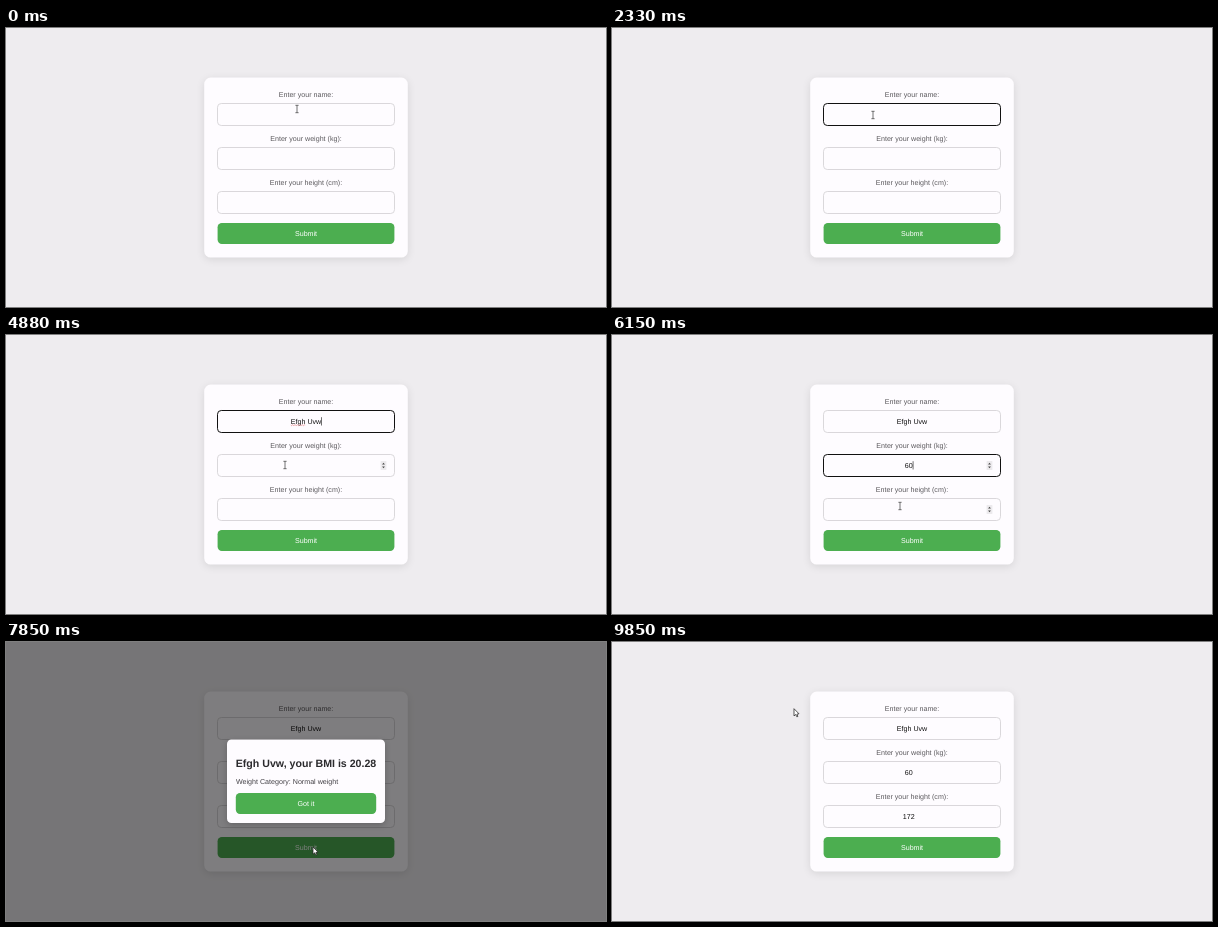
An HTML page with a canvas that plays this animation: 600x279 px, repeating every 9880 ms.

```html
<!DOCTYPE html>
<html lang="en">
<head>
<meta charset="utf-8">
<title>BMI form</title>
<style>
  html, body { margin: 0; width: 100%; height: 100%; overflow: hidden; background: #eeecef; }
  canvas { display: block; width: 600px; height: 279px; }
</style>
</head>
<body>
<canvas id="stage"></canvas>
<script>
const W = 600, H = 279, MID = W / 2, LOOP = 9880;
const BLINK = 235, GLIDE = 220;
const OPEN = 7850, CLOSE = 9610;
const FONT = '"Liberation Sans", Arial, sans-serif';
const SIZE = 7.11;
const NAME = 'Efgh Uvw';
const INK = '#111', CARD = '#fefcff', GREEN = '#4cae50', GREEN_HOVER = '#45a049';

const canvas = document.getElementById('stage');
const ctx = canvas.getContext('2d');
const dpr = window.devicePixelRatio || 1;
canvas.width = W * dpr;
canvas.height = H * dpr;

// each value is typed at an even pace between "from" and "to"
const fields = [
  { label: 'Enter your name:', value: NAME, focus: 1910, from: 2730, to: 4330 },
  { label: 'Enter your weight (kg):', value: '60', focus: 5030, from: 5520, to: 5640, number: true },
  { label: 'Enter your height (cm):', value: '172', focus: 6330, from: 6730, to: 7090, number: true }
];
fields.forEach((f, i) => {
  f.rect = { x: 211, y: Math.round(75 + 44.1 * i), w: 178, h: 23 };
  f.cx = f.number ? MID - 3.2 : MID;
  f.blur = i < 2 ? fields[i + 1].focus : 7640;
});
const submitBtn = { x: 211.6, y: 195, w: 176.8, h: 21, text: 'Submit' };
const closeBtn = { x: 229.8, y: 151, w: 140.4, h: 21, text: 'Got it' };
const note = { x: 230, y: 135, w: 102, h: 9 };

// pointer stops: where it rests and when it gets there
const stops = [
  { at: 0, x: 291, y: 81 },
  { at: 790, x: 268, y: 87 },
  { at: 1360, x: 261, y: 87 },
  { at: 4880, x: 279, y: 130 },
  { at: 6150, x: 288, y: 171 },
  { at: 7600, x: 307, y: 205 },
  { at: 8730, x: 320, y: 137 },
  { at: 9480, x: 331, y: 161 },
  { at: 9850, x: 182, y: 66.7 }
];

const clamp = v => Math.max(0, Math.min(1, v));
const inside = (p, r) => p.x >= r.x && p.x <= r.x + r.w && p.y >= r.y && p.y <= r.y + r.h;
const isOpen = t => t >= OPEN && t < CLOSE;

function pointerAt(t) {
  let { x, y } = stops[0];
  for (const s of stops.slice(1)) {
    const k = clamp((t - s.at + GLIDE) / GLIDE);
    const e = k * k * (3 - 2 * k);
    x += (s.x - x) * e;
    y += (s.y - y) * e;
  }
  return { x, y };
}

function pointerKind(p, modal) {
  if (inside(p, modal ? closeBtn : submitBtn)) return 'hand';
  const texts = modal ? [note] : fields.map(f => f.rect);
  return texts.some(r => inside(p, r)) ? 'beam' : 'arrow';
}

function box(x, y, w, h, r, fill) {
  ctx.beginPath();
  ctx.roundRect(x, y, w, h, r);
  ctx.fillStyle = fill;
  ctx.fill();
}

function stroke(color, width) {
  ctx.strokeStyle = color;
  ctx.lineWidth = width;
  ctx.stroke();
}

function setFont(size = SIZE, weight = 400) {
  ctx.font = `${weight} ${size}px ${FONT}`;
  ctx.textRendering = 'geometricPrecision';
}

function text(s, x, y, color, align = 'center', size, weight) {
  setFont(size, weight);
  ctx.textAlign = align;
  ctx.fillStyle = color;
  ctx.fillText(s, x, y);
}

function panel(x, y, w, h, r, blur, alpha) {
  ctx.save();
  ctx.shadowColor = `rgba(0,0,0,${alpha})`;
  ctx.shadowBlur = blur * dpr;
  ctx.shadowOffsetY = 2 * dpr;
  box(x, y, w, h, r, CARD);
  ctx.restore();
}

function button(b, hover) {
  box(b.x, b.y, b.w, b.h, 4.2, hover ? GREEN_HOVER : GREEN);
  text(b.text, MID, b.y + 13, '#fff');
}

function squiggle(x, w, y) {
  ctx.beginPath();
  for (let i = 0; i <= w; i += 0.4) ctx.lineTo(x + i, y + 0.4 * Math.sin(i * 2.6));
  stroke('#e0686c', 0.6);
}

function spinner(y) {
  box(374.6, y + 7, 5.8, 9, 0.5, '#eceaed');
  for (const dir of [-1, 1]) {
    const base = y + 11.5 + dir;
    ctx.beginPath();
    ctx.moveTo(376.1, base);
    ctx.lineTo(378.9, base);
    ctx.lineTo(377.5, base + 1.7 * dir);
    ctx.fillStyle = '#444';
    ctx.fill();
  }
}

function drawField(f, t, hover) {
  const { x, y, w, h } = f.rect;
  const focused = t >= f.focus && t < f.blur;
  text(f.label, MID, y - 6.3, '#5c5a5e');
  box(x + 0.5, y + 0.5, w - 1, h - 1, 3.8, CARD);
  stroke(focused ? INK : '#d6d4d7', focused ? 1 : 0.9);

  const pace = (f.to - f.from) / (f.value.length - 1);
  const count = t < f.from ? 0 : Math.min(f.value.length, 1 + Math.floor((t - f.from) / pace));
  const shown = f.value.slice(0, count);
  setFont();
  const width = ctx.measureText(shown).width;
  const left = f.cx - width / 2;
  const base = y + 13.7;
  text(shown, left, base, INK, 'left');

  if (focused) {
    const word = f.value.indexOf(' ');
    if (word > 0 && count > word) {
      squiggle(left, ctx.measureText(f.value.slice(0, word)).width, base + 1.5);
    }
    const lastKey = count ? f.from + (count - 1) * pace : f.focus;
    if (Math.floor((t - lastKey) / BLINK) % 2 === 0) {
      ctx.fillStyle = INK;
      ctx.fillRect(left + width, y + 7.2, 0.6, 8.3);
    }
  }
  if (f.number && (focused || hover)) spinner(y);
}

function drawModal(hover) {
  ctx.fillStyle = 'rgba(0,0,0,0.5)';
  ctx.fillRect(0, 0, W, H);
  panel(221, 97.5, 158, 83.6, 4.4, 6, 0.2);
  text(NAME + ', your BMI is 20.28', MID, 125, '#2b2a2d', 'center', 10.62, 700);
  text('Weight Category: Normal weight', note.x, 142, '#444247', 'left');
  button(closeBtn, hover);
}

const cursors = {
  beam() {
    ctx.beginPath();
    for (const end of [-3.7, 3.7]) {
      ctx.moveTo(-1.6, end);
      ctx.lineTo(1.6, end);
    }
    ctx.moveTo(0, -3.7);
    ctx.lineTo(0, 3.7);
    stroke('#444', 0.75);
  },
  hand() {
    const shape = new Path2D();
    shape.roundRect(-0.8, 0, 1.6, 6, 0.8);
    shape.roundRect(-1.6, 3.4, 5.8, 5.4, 1.6);
    ctx.strokeStyle = '#222';
    ctx.lineWidth = 1.3;
    ctx.stroke(shape);
    ctx.fillStyle = '#fff';
    ctx.fill(shape);
  },
  arrow() {
    ctx.beginPath();
    ctx.moveTo(0, 0);
    ctx.lineTo(0, 7.2);
    ctx.lineTo(1.7, 5.8);
    ctx.lineTo(2.9, 8.2);
    ctx.lineTo(3.9, 7.7);
    ctx.lineTo(2.9, 5.4);
    ctx.lineTo(5, 5.1);
    ctx.closePath();
    ctx.fillStyle = '#fff';
    ctx.fill();
    stroke('#222', 0.75);
  }
};

function draw(t) {
  const p = pointerAt(t);
  const modal = isOpen(t);
  ctx.setTransform(dpr, 0, 0, dpr, 0, 0);
  ctx.fillStyle = '#eeecef';
  ctx.fillRect(0, 0, W, H);
  panel(198.2, 49.6, 203.6, 180, 6.7, 9, 0.1);
  fields.forEach(f => drawField(f, t, !modal && inside(p, f.rect)));
  button(submitBtn, !modal && inside(p, submitBtn));
  if (modal) drawModal(inside(p, closeBtn));
  ctx.translate(p.x, p.y);
  cursors[pointerKind(p, modal)]();
}

const start = performance.now();
function tick() {
  draw((performance.now() - start) % LOOP);
  requestAnimationFrame(tick);
}
tick();
</script>
</body>
</html>
```
